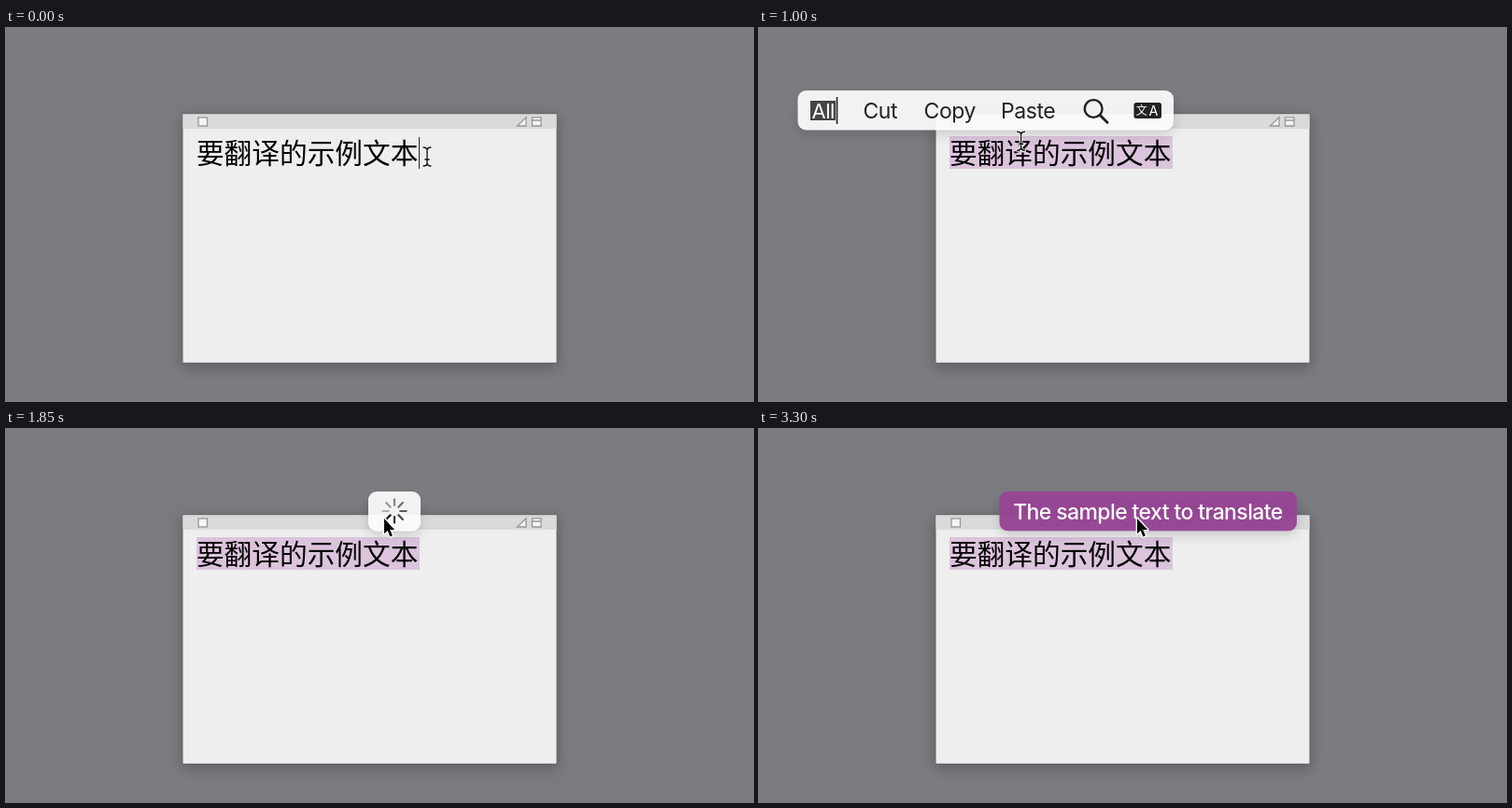
Recreate the animation shown at these times as an HTML page. Size 800 by 400 pixels, loop 3.35 s.

```html
<!DOCTYPE html>
<html lang="zh-CN">
<head>
<meta charset="utf-8">
<title>Select and translate</title>
<style>
  html, body { margin: 0; width: 100%; height: 100%; overflow: hidden; background: #7b7c80; }
  svg { display: block; width: 800px; height: 400px; }
  text { white-space: pre; }
  .doc { font: 29.7px "Noto Sans CJK SC", "Noto Sans CJK", sans-serif; fill: #000; }
  .label { font: 23px Inter, "Open Sans", sans-serif; letter-spacing: -.45px; fill: #222224; }
  .window { filter: drop-shadow(0 4px 8px rgba(0, 0, 0, .27)); }
  .panel { filter: drop-shadow(0 5px 6px rgba(0, 0, 0, .15)); }
  .icon { fill: #f4f4f4; stroke: #979797; stroke-width: 1.3; }
  .pointer { fill: #000; stroke: #fff; stroke-width: 2.8; paint-order: stroke; stroke-linejoin: round; }
</style>
</head>
<body>
<svg viewBox="0 0 800 400">
  <rect width="800" height="400" fill="#7b7c80"/>

  <g class="window">
    <rect x="188.8" y="91.7" width="401.4" height="267.8" fill="#5e5f62"/>
    <rect x="189.5" y="92.5" width="400" height="266.3" fill="#eee"/>
  </g>
  <rect x="189.5" y="92.5" width="400" height="15.5" fill="#dadada"/>
  <rect class="icon" x="206" y="96" width="9.5" height="9"/>
  <path class="icon" d="M547.5 105H557V95.8Z"/>
  <path class="icon" d="M563.5 95.8H573V105H563.5ZM563.5 99H573"/>

  <rect id="selection" y="116" height="35" fill="#dcc4dc"/>
  <text class="doc" x="203.9" y="145">要翻译的示例文本</text>
  <path id="caret" d="M442.5 117V151" stroke="#222"/>

  <g id="menu">
    <rect class="panel" x="41.5" y="67" width="402.5" height="42.5" rx="9" fill="#fff" fill-opacity=".91"/>
    <rect x="55" y="78" width="27" height="21" fill="#444446"/>
    <text class="label" x="56.5" y="96.8" style="font-size:22px;fill:#fff">All</text>
    <path d="M83.5 74V103" stroke="#222224" stroke-width="1.6"/>
    <text class="label" x="111.5" y="97">Cut</text>
    <text class="label" x="176.6" y="97">Copy</text>
    <text class="label" x="259" y="97">Paste</text>
    <g fill="none" stroke="#222224" stroke-width="2.4" stroke-linecap="round">
      <circle cx="358.2" cy="86.5" r="9.4"/>
      <path d="M365.2 93.5L373 101.3" stroke-width="3"/>
    </g>
    <rect x="401.5" y="80" width="29.5" height="17" rx="2.5" fill="#222224"/>
    <text class="doc" x="403.7" y="93" style="font-size:12px;font-weight:500;fill:#fff">文</text>
    <text class="label" x="417.6" y="93.7" style="font-size:14.5px;fill:#fff">A</text>
  </g>

  <g id="loader">
    <rect class="panel" x="388" y="67" width="56" height="42.5" rx="9" fill="#fff" fill-opacity=".91"/>
    <g id="spokes" transform="translate(416 88)" stroke="#1c1c1e" stroke-width="2.2" stroke-linecap="round"></g>
  </g>

  <g id="result">
    <rect class="panel" x="257.5" y="67" width="318.5" height="42.3" rx="9" fill="#964694" fill-opacity=".97"/>
    <text class="label" x="272.2" y="97" style="font-weight:500;letter-spacing:-.6px;fill:#fff">The sample text to translate</text>
  </g>

  <g id="pointer">
    <g id="beam" fill="none" stroke-linecap="round">
      <use href="#beamShape" stroke="#fff" stroke-width="3.2"/>
      <use href="#beamShape" stroke="#111" stroke-width="1.4"/>
    </g>
    <path id="resize" class="pointer" d="M0 -10.3L6 -3.8H1.6V3.8H6L0 10.3L-6 3.8H-1.6V-3.8H-6Z"/>
    <path id="arrow" class="pointer" d="M0 -1V15.3L3.7 12L6.4 18.4L8.9 17.3L6.2 11H11.2Z"/>
  </g>
  <defs>
    <path id="beamShape" d="M-4 -10Q-.6 -10 0 -7.5Q.6 -10 4 -10M-4 10Q-.6 10 0 7.5Q.6 10 4 10M0 -8V8M-2.2 3H2.2"/>
  </defs>
</svg>
<script>
const LOOP = 3350, STEP = 50;
const TEXT_LEFT = 204, TEXT_RIGHT = 443, GLYPH = 29.75;
const $ = id => document.getElementById(id);
const clamp = v => Math.min(1, Math.max(0, v));
const ramp = (t, a, b) => clamp((t - a) / (b - a));
const ease = p => p < .5 ? 2 * p * p : 1 - 2 * (1 - p) ** 2;
const show = (id, on) => { $(id).style.opacity = Number(on); };

// pointer stops: time, x, y
const path = [
  [0, 451, 138], [50, 451, 138], [483, 205, 134],
  [800, 205, 136], [1260, 405, 97], [LOOP, 405, 97]
];

function pointerAt(t) {
  const i = path.findIndex(p => p[0] > t);
  const [a, b] = [path[i - 1], path[i]];
  const p = ease(ramp(t, a[0], b[0]));
  return [a[1] + (b[1] - a[1]) * p, a[2] + (b[2] - a[2]) * p];
}

const spokes = Array.from({ length: 8 }, (_, i) => {
  const line = document.createElementNS($("spokes").namespaceURI, "path");
  line.setAttribute("d", "M6.2 0H12.6");
  line.setAttribute("transform", `rotate(${i * 45})`);
  return $("spokes").appendChild(line);
});

function draw(t) {
  const [x, y] = pointerAt(t);
  $("pointer").setAttribute("transform", `translate(${x.toFixed(2)} ${y.toFixed(2)})`);
  const kind = t >= 1600 ? "arrow" : y > 105 ? "beam" : "resize";
  for (const id of ["beam", "resize", "arrow"]) show(id, id === kind);

  // the selection snaps to whole glyphs and stays once complete
  const glyph = t >= 483 ? 0 : clamp(Math.round((x - TEXT_LEFT) / GLYPH) / 8) * 8;
  const left = TEXT_LEFT + glyph * GLYPH;
  $("selection").setAttribute("x", left);
  $("selection").setAttribute("width", glyph < 8 ? TEXT_RIGHT - left : 0);
  show("caret", glyph === 8);

  show("menu", ramp(t, 575, 775) * (1 - ramp(t, 1350, 1545)));
  show("loader", ramp(t, 1550, 1700) * (1 - ramp(t, 2025, 2200)));
  show("result", ramp(t, 2025, 2225));

  const lead = Math.floor(t / 100) + 1;
  spokes.forEach((s, i) => {
    s.style.opacity = 1 - .1 * ((lead - i + 80) % 8);
  });
}

function tick() {
  const t = performance.now() % LOOP;
  draw(Math.floor(t / STEP) * STEP);
  requestAnimationFrame(tick);
}
tick();
</script>
</body>
</html>
```
